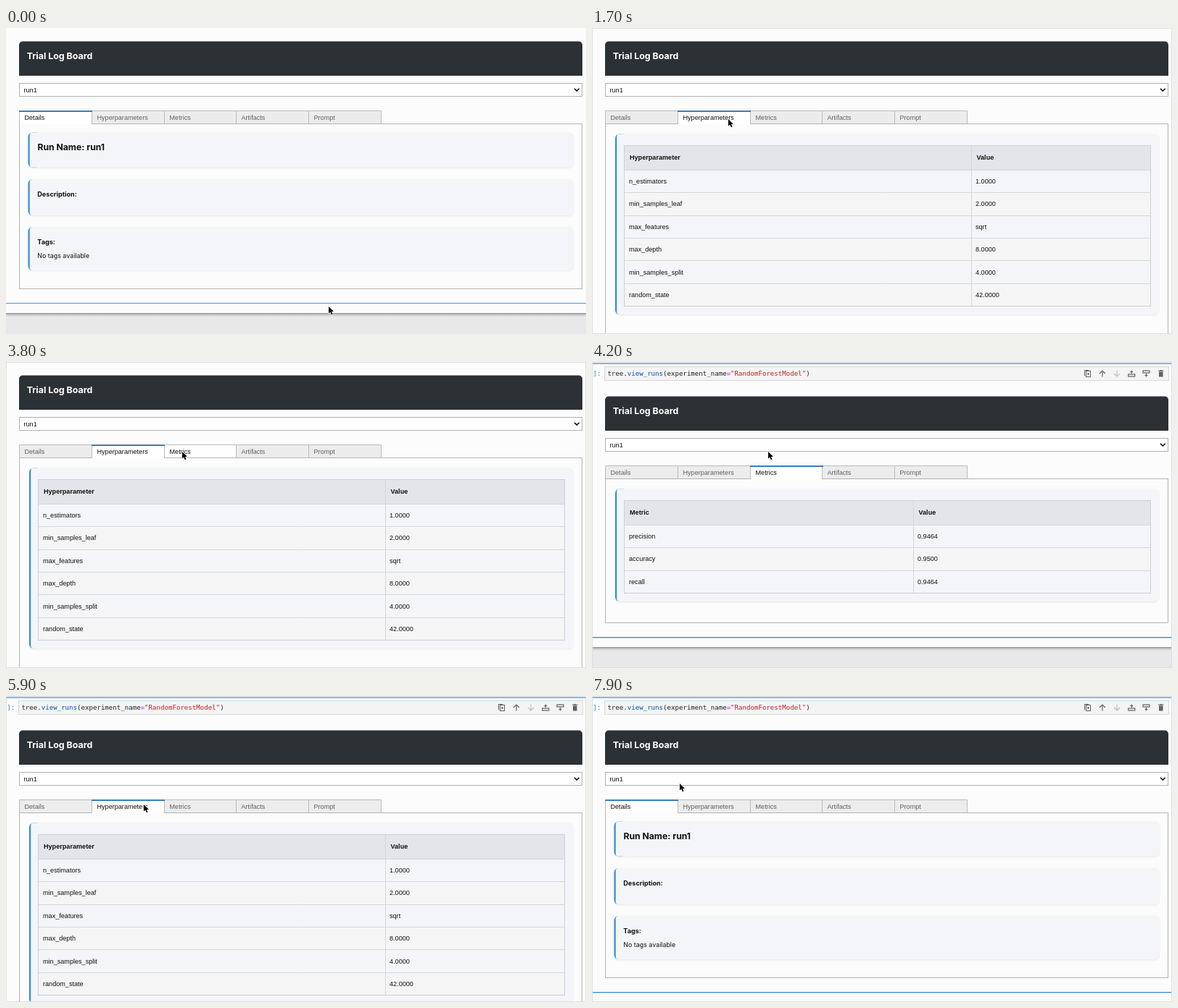
These frames come from a looping animation (800x423 px, 8000 ms). An HTML page with a canvas:

```html
<!DOCTYPE html>
<html lang="en">
<head>
<meta charset="utf-8">
<title>Run viewer</title>
<style>
  html, body { margin: 0; width: 100%; height: 100%; overflow: hidden; background: #fcfcfd; }
  canvas { display: block; width: 800px; height: 423px; }
</style>
</head>
<body>
<canvas id="stage"></canvas>
<script>
const W = 800, H = 423, LOOP = 8000, STEP = 100;
const canvas = document.getElementById('stage');
const ratio = window.devicePixelRatio || 1;
canvas.width = W * ratio;
canvas.height = H * ratio;
const g = canvas.getContext('2d');

const ARIAL = '"Liberation Sans", Arial, sans-serif';
const INTER = 'Inter, sans-serif';
const MONO = '"DejaVu Sans Mono", monospace';
const BLUE = '#2f8fd8';

const TABS = ['Details', 'Hyperparameters', 'Metrics', 'Artifacts', 'Prompt'];
const TABLES = {
  1: { head: 'Hyperparameter', split: 523, rows: [
    ['n_estimators', '1.0000'], ['min_samples_leaf', '2.0000'], ['max_features', 'sqrt'],
    ['max_depth', '8.0000'], ['min_samples_split', '4.0000'], ['random_state', '42.0000']] },
  2: { head: 'Metric', split: 443, rows: [
    ['precision', '0.9464'], ['accuracy', '0.9500'], ['recall', '0.9464']] }
};

// start time, open tab, vertical shift of the page
const VIEWS = [[0, 0, 0], [1400, 1, 0], [4200, 2, 29], [5500, 1, 29], [7400, 0, 29]];

// time, x, y of the pointer tip
const PATH = [
  [0, 445, 385], [400, 400, 300], [600, 400, 300], [1100, 189, 133], [1400, 188, 126],
  [2300, 188, 126], [2800, 243, 124], [4200, 243, 124], [5000, 215, 137], [5500, 190, 150],
  [6200, 190, 150], [7000, 97, 151], [7400, 97, 151], [7900, 121, 121], [8000, 121, 121]
];

function pointerAt(t) {
  const i = PATH.findIndex(k => k[0] > t);
  const [t0, x0, y0] = PATH[i - 1], [t1, x1, y1] = PATH[i];
  const p = (t - t0) / (t1 - t0), e = p * p * (3 - 2 * p);
  return { x: x0 + (x1 - x0) * e, y: y0 + (y1 - y0) * e };
}

function box(x, y, w, h, fill) {
  g.fillStyle = fill;
  g.fillRect(x, y, w, h);
}

function frame(x, y, w, h, color) {
  g.strokeStyle = color;
  g.lineWidth = 1;
  g.strokeRect(x + 0.5, y + 0.5, w - 1, h - 1);
}

function text(s, x, y, font, color = '#111') {
  g.font = font;
  g.fillStyle = color;
  g.fillText(s, x, y);
  return x + g.measureText(s).width;
}

function line(points, color, width = 1) {
  g.strokeStyle = color;
  g.lineWidth = width;
  g.beginPath();
  points.forEach(([x, y], i) => i ? g.lineTo(x, y) : g.moveTo(x, y));
  g.stroke();
}

function rounded(x, y, w, h, r, fill) {
  g.fillStyle = fill;
  g.beginPath();
  g.roundRect(x, y, w, h, r);
  g.fill();
}

// grey card with a soft shadow and a blue left edge
function card(x, y, w, h) {
  g.save();
  g.shadowColor = 'rgba(0,0,0,.09)';
  g.shadowBlur = 3 * ratio;
  g.shadowOffsetY = ratio;
  rounded(x, y, w, h, 6, '#f4f5f8');
  g.restore();
  rounded(x, y, 12, h, [6, 0, 0, 6], BLUE);
  rounded(x + 2.2, y, 12, h, [4, 0, 0, 4], '#f4f5f8');
}

// both content painters return the bottom of the surrounding panel
function details() {
  card(30.5, 144.5, 752, 48);
  text('Run Name: run1', 43.4, 169, `700 12.2px ${INTER}`);
  card(30.5, 209, 752, 50);
  text('Description:', 43.3, 232.5, `700 9.1px ${INTER}`);
  card(30.5, 275, 752, 60);
  text('Tags:', 43.3, 298.7, `700 9.1px ${INTER}`);
  text('No tags available', 43.3, 318.2, `8.9px ${INTER}`);
  return 361;
}

function table({ head, split, rows }) {
  const x = 44.5, right = 770.5, top = 162.5, first = 196.5, step = 31.35;
  const bottom = first + step * rows.length;
  const rule = '#d6d7db';
  card(32, 146.5, 750, bottom + 11.5 - 146.5);
  box(x, top, right - x, first - top, '#e4e5ea');
  text(head, 52, 182.3, `bold 9.1px ${ARIAL}`);
  text('Value', split + 7.5, 182.3, `bold 9.1px ${ARIAL}`);
  rows.forEach(([name, value], i) => {
    const y = first + i * step, edge = Math.floor(y) + 0.5;
    box(x, y, right - x, step, i % 2 ? '#f5f5f5' : '#f4f5f9');
    line([[x, edge], [right, edge]], rule);
    text(name, 51, y + 18.6, `9.1px ${ARIAL}`);
    text(value, split + 6, y + 18.6, `9.1px ${ARIAL}`);
  });
  line([[split + 0.5, top], [split + 0.5, bottom]], rule);
  frame(44, 162, 727, Math.floor(bottom) - 161, '#cfd0d4');
  return Math.floor(bottom + 41.5);
}

function tabBar(open, pointer) {
  TABS.forEach((name, i) => {
    const x = 18 + Math.round(i * 99.8), w = 101;
    const hover = pointer.x >= x && pointer.x < x + 100 && pointer.y >= 114.5 && pointer.y < 132;
    const active = i === open, lit = active || hover;
    box(x, 114, w, active ? 19 : 18, lit ? '#fff' : '#ececed');
    line([[x + 0.5, 133], [x + 0.5, 114.5], [x + w - 0.5, 114.5], [x + w - 0.5, 133]], '#bcbcbd');
    if (!active) line([[x, 132.5], [x + w, 132.5]], '#b4b4b5');
    text(name, x + 7.5, 126.8, `9.1px ${ARIAL}`, lit ? '#111' : '#616161');
  });
  box(18 + Math.round(open * 99.8), 114.3, 101, 1.7, '#2374b8');
}

function icons() {
  const c = '#616161', y = 16;
  frame(681, 12, 7, 9, c);
  line([[679.5, 19.5], [679.5, 11.5], [685, 11.5]], c);
  line([[683, 16.5], [686, 16.5]], c);
  line([[684.5, 15], [684.5, 18]], c);
  const arrow = (x, d, color) => {
    line([[x, y - 4 * d], [x, y + 4.5 * d]], color, 1.2);
    line([[x - 4, y], [x, y - 4 * d], [x + 4, y]], color, 1.2);
  };
  arrow(704, 1, c);
  arrow(724, -1, '#bdbdbd');
  const insert = (x, d) => {
    g.strokeStyle = c;
    g.lineWidth = 1.2;
    g.strokeRect(x - 4.5, y + 2.5 * d - 1.5, 9, 3);
    line([[x, y], [x, y - 4.5 * d]], c, 1.2);
    line([[x - 2, y - 2.5 * d], [x + 2, y - 2.5 * d]], c, 1.2);
  };
  insert(744.3, 1);
  insert(764.5, -1);
  box(782, 13.5, 5.5, 7, c);
  box(781, 11.7, 7.5, 1.1, c);
  box(783.3, 11, 3, 1, c);
}

function codeCell() {
  box(0, 1.5, W, 1.5, '#5ea5de');
  box(17, 6, 779, 20, '#f4f4f5');
  frame(17, 6, 779, 20, '#d9d9da');
  const font = `9.1px ${MONO}`;
  text('7]:', -4.3, 18.8, font, '#307fc1');
  let x = 21.4;
  [['tree.', '#222'], ['view_runs', '#0055aa'], ['(experiment_name', '#222'], ['=', '#aa22ff'],
    ['"RandomForestModel"', '#ba2121'], [')', '#222']]
    .forEach(([s, color]) => { x = text(s, x, 18.8, font, color); });
  icons();
}

function pageEnd(y) {
  box(0, y, W, H, '#e8e8ea');
  const shade = g.createLinearGradient(0, y, 0, y + 5);
  shade.addColorStop(0, '#8d8d8f');
  shade.addColorStop(0.4, '#c2c2c4');
  shade.addColorStop(1, '#e8e8ea');
  box(0, y, W, 5, shade);
}

function pointerShape({ x, y }) {
  g.save();
  g.translate(x, y);
  g.beginPath();
  [[0, 0], [0, 9.6], [2.2, 7.6], [3.8, 11.2], [5.5, 10.4], [4, 7], [6.9, 6.8]]
    .forEach(([a, b]) => g.lineTo(a, b));
  g.closePath();
  g.lineJoin = 'round';
  g.strokeStyle = '#fff';
  g.lineWidth = 1.4;
  g.stroke();
  g.fillStyle = '#000';
  g.fill();
  g.restore();
}

function draw(t) {
  const [start, open, dy] = VIEWS.filter(v => v[0] <= t).pop();
  const pointer = pointerAt(t);
  g.setTransform(ratio, 0, 0, ratio, 0, 0);
  box(0, 0, W, H, '#fcfcfd');
  if (dy) codeCell();

  g.save();
  g.translate(0, dy);
  rounded(18, 18.5, 777, 47.5, [5, 5, 0, 0], '#2c3135');
  text('Trial Log Board', 28.7, 42.8, `700 12.4px ${INTER}`, '#fff');

  box(18, 76, 777, 19, '#fff');
  frame(18, 76, 777, 19, '#b2b2b3');
  text('run1', 24.5, 88.8, `9.1px ${ARIAL}`);
  line([[784, 83.7], [787.3, 87], [790.6, 83.7]], '#111', 1.6);

  const panelEnd = open ? table(TABLES[open]) : details();
  frame(18, 132, 777, panelEnd - 132, '#b4b4b5');
  tabBar(open, { x: pointer.x, y: pointer.y - dy });
  box(0, panelEnd + 19, W, dy ? 1.5 : 1, '#4a97d3');
  pageEnd(panelEnd + 33);
  g.restore();

  if (start > 0) frame(0, 0, W, H, '#dfdfe1');
  pointerShape(pointer);
}

function tick(now) {
  draw(Math.floor((now % LOOP) / STEP) * STEP);
  requestAnimationFrame(tick);
}
draw(0);
requestAnimationFrame(tick);
</script>
</body>
</html>
```
